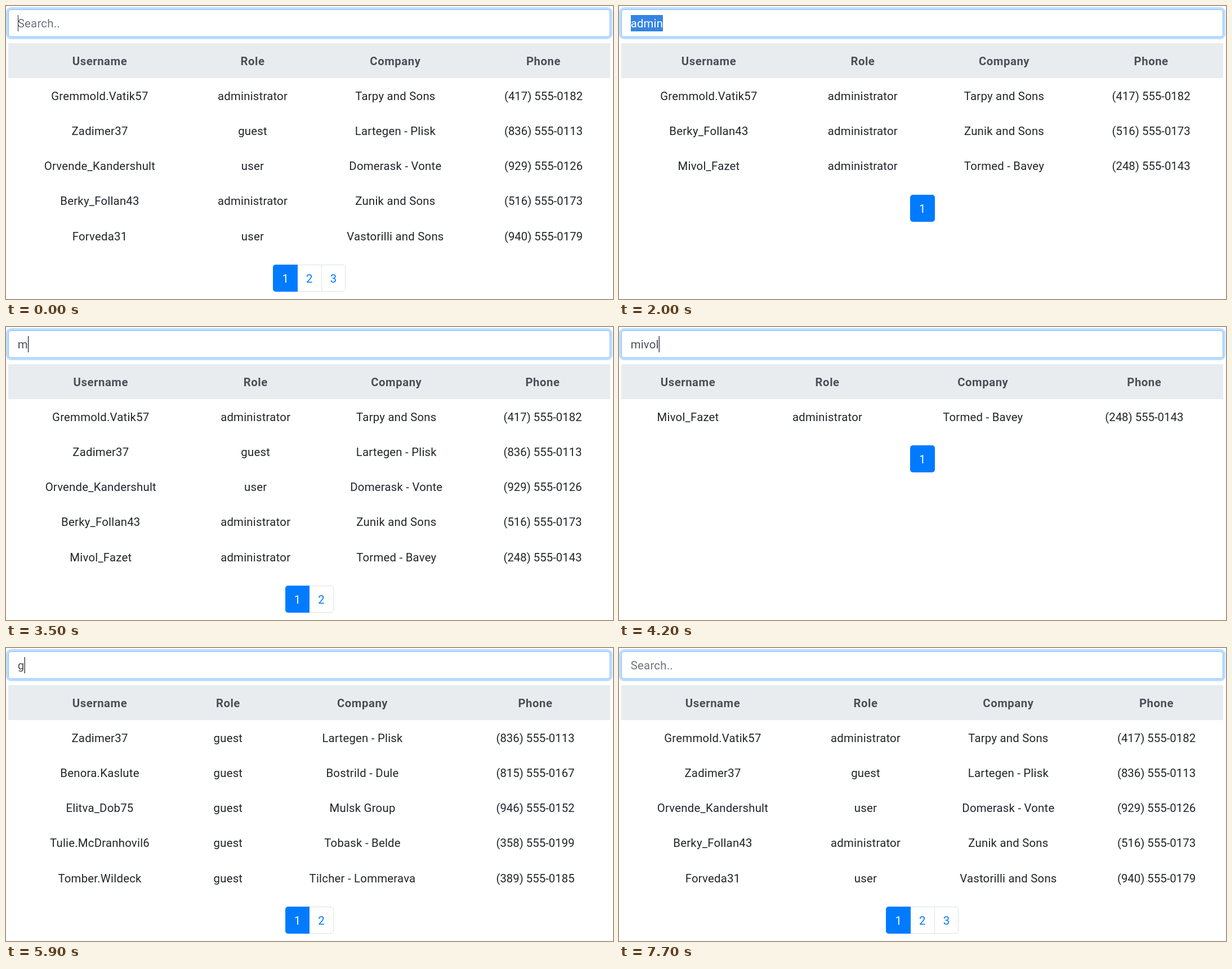
An HTML page for the animation above (8.4 s loop, 1078 by 520 pixels).

```html
<!DOCTYPE html>
<html lang="en">
<head>
<meta charset="utf-8">
<title>Table search</title>
<style>
  html, body { margin: 0; width: 100%; height: 100%; overflow: hidden; background: #fff; }
  svg { display: block; width: 100vw; height: 100vh; }
  text { font: 20.38px Roboto, sans-serif; fill: #212529; letter-spacing: .22px; text-anchor: middle; }
  .head { font-weight: 700; fill: #495057; letter-spacing: .52px; }
  .phone { letter-spacing: 0; }
  .page { fill: #007bff; letter-spacing: 0; }
  .on { fill: #fff; }
  .query { text-anchor: start; fill: #495057; letter-spacing: .12px; }
  .hint { text-anchor: start; fill: #6c757d; }
  .picked { fill: #fff; }
</style>
</head>
<body>
<svg viewBox="0 0 1078 520">
  <rect y="2" width="1077" height="57" rx="9" fill="#bfdeff"/>
  <rect x="4.5" y="6.5" width="1068" height="48" rx="4.6" fill="#fff" stroke="#80bdff"/>
  <rect x="4" y="66" width="1069" height="62" fill="#e9ecef"/>
  <g id="search"></g>
  <g id="table"></g>
</svg>
<script>
const LOOP = 8400, ROW = 62.15, LEFT = 21, MID = 538.8;
const HEADS = ["Username", "Role", "Company", "Phone"];

const USERS = {
  gremmold: ["Gremmold.Vatik57", "administrator", "Tarpy and Sons", "(417) 555-0182"],
  zadimer: ["Zadimer37", "guest", "Lartegen - Plisk", "(836) 555-0113"],
  orvende: ["Orvende_Kandershult", "user", "Domerask - Vonte", "(929) 555-0126"],
  berky: ["Berky_Follan43", "administrator", "Zunik and Sons", "(516) 555-0173"],
  forveda: ["Forveda31", "user", "Vastorilli and Sons", "(940) 555-0179"],
  mivol: ["Mivol_Fazet", "administrator", "Tormed - Bavey", "(248) 555-0143"],
  benora: ["Benora.Kaslute", "guest", "Bostrild - Dule", "(815) 555-0167"],
  elitva: ["Elitva_Dob75", "guest", "Mulsk Group", "(946) 555-0152"],
  tulie: ["Tulie.McDranhovil6", "guest", "Tobask - Belde", "(358) 555-0199"],
  tomber: ["Tomber.Wildeck", "guest", "Tilcher - Lommerava", "(389) 555-0185"]
};

const view = (names, pages, cols) => ({ rows: names.split(" ").map(n => USERS[n]), pages, cols });
const ADMIN_COLS = [159.5, 432.9, 684, 945.1];
const VIEWS = {
  all: view("gremmold zadimer orvende berky forveda", 3, [166.5, 438, 691.4, 954.5]),
  ad: view("gremmold zadimer berky mivol", 1, ADMIN_COLS),
  admin: view("gremmold berky mivol", 1, ADMIN_COLS),
  m: view("gremmold zadimer orvende berky mivol", 2, [168.3, 443.2, 693.3, 953]),
  mivol: view("mivol", 1, [122.5, 370.1, 646.3, 932.8]),
  guest: view("zadimer benora elitva tulie tomber", 2, [166.5, 394.4, 633, 940])
};

// start time, query, view, cursor: "|" caret, "#" selection, "" hidden
const STEPS = [
  [0, "", "all", "|"], [400, "", "all", ""],
  [600, "ad", "ad", "|"], [700, "admi", "admin", "|"], [900, "admin", "admin", "|"],
  [1600, "admin", "admin", ""], [2000, "admin", "admin", "#"],
  [2900, "", "all", "|"], [3500, "m", "m", "|"], [3800, "mi", "admin", "|"],
  [4000, "miv", "mivol", "|"], [4100, "mivo", "mivol", "|"], [4200, "mivol", "mivol", "|"],
  [5000, "mivol", "mivol", "#"], [5200, "", "all", "|"], [5300, "", "all", ""],
  [5900, "g", "guest", "|"], [6000, "gu", "guest", "|"], [6100, "gue", "guest", "|"],
  [6300, "gues", "guest", "|"], [6400, "guest", "guest", "|"], [6900, "guest", "guest", "#"],
  [7100, "", "all", "|"], [7700, "", "all", ""]
];

const search = document.getElementById("search");
const table = document.getElementById("table");

function add(parent, tag, attrs, content) {
  const el = document.createElementNS(parent.namespaceURI, tag);
  for (const key in attrs) el.setAttribute(key, attrs[key]);
  if (content !== undefined) el.textContent = content;
  return parent.appendChild(el);
}

const label = (parent, x, y, content, cls = "") => add(parent, "text", { x, y, class: cls }, content);
const bar = (x, width, fill) => add(search, "rect", { x, y: 16, width, height: 29, fill });

function drawSearch(query, cursor) {
  search.replaceChildren();
  const text = query
    ? label(search, LEFT - .2, 38, query, cursor === "#" ? "query picked" : "query")
    : label(search, LEFT - .2, 38, "Search..", "hint");
  const width = query ? text.getComputedTextLength() : 0;
  if (cursor === "|") bar(LEFT + width, query ? 1.27 : 1, "#212529");
  if (cursor === "#") search.insertBefore(bar(LEFT, Math.round(width), "#3584e4"), text);
}

// Box edges sit on whole pixels, the numbers do not.
function drawPages(count, top) {
  const step = 42.57, size = 48;
  const start = MID - (count * step + 1) / 2;
  const edge = i => Math.round(start + i * step);
  const left = edge(0), right = edge(1) + 1, end = top + size;
  if (count > 1) {
    add(table, "rect", {
      x: left + .5, y: top + .5, width: edge(count) - left, height: size - 1,
      rx: 4.6, fill: "#fff", stroke: "#dee2e6"
    });
  }
  for (let i = 2; i < count; i++) {
    add(table, "rect", { x: edge(i), y: top, width: 1, height: size, fill: "#dee2e6" });
  }
  const rightSide = count > 1
    ? `M${right} ${top}V${end}`
    : `M${right - 5} ${top}a5 5 0 0 1 5 5V${end - 5}a5 5 0 0 1 -5 5`;
  const leftSide = `H${left + 5}a5 5 0 0 1 -5 -5V${top + 5}a5 5 0 0 1 5 -5Z`;
  add(table, "path", { d: rightSide + leftSide, fill: "#007bff" });
  for (let i = 0; i < count; i++) {
    label(table, start + .5 + (i + .5) * step, top + 32, i + 1, i ? "page" : "page on");
  }
}

function drawTable({ rows, pages, cols }) {
  table.replaceChildren();
  cols.forEach((x, c) => {
    label(table, x, 105, HEADS[c], "head");
    rows.forEach((row, r) => label(table, x, Math.round(167 + r * ROW), row[c], c === 3 ? "phone" : ""));
  });
  drawPages(pages, Math.round(148.2 + rows.length * ROW));
}

let shown;
function render(time) {
  const step = STEPS.findLast(s => s[0] <= time);
  if (step === shown) return;
  shown = step;
  drawSearch(step[1], step[3]);
  drawTable(VIEWS[step[2]]);
}

const start = performance.now();
function tick() {
  render((performance.now() - start) % LOOP);
  requestAnimationFrame(tick);
}
tick();
</script>
</body>
</html>
```
